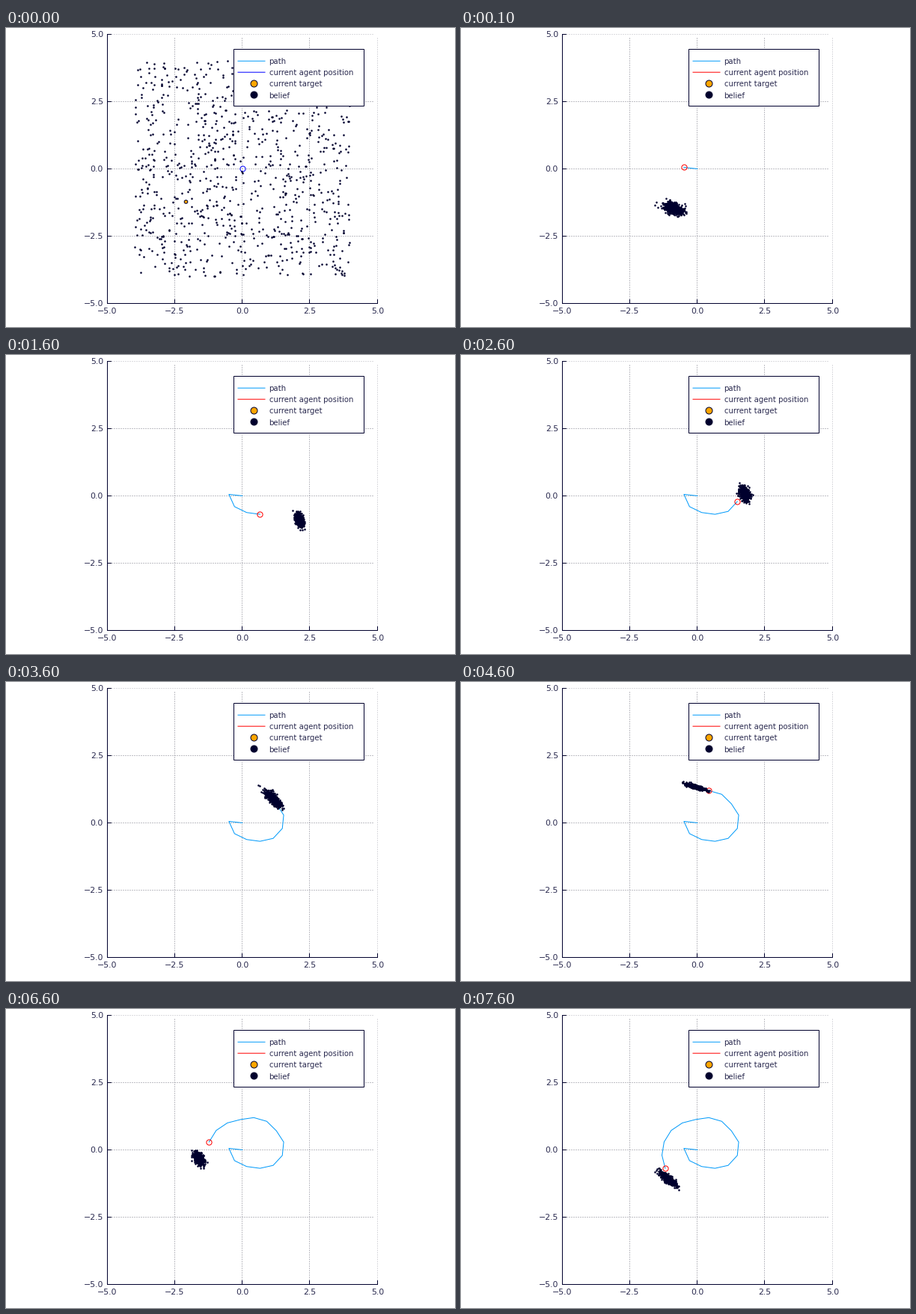
These frames come from a looping animation (600x400 px, 8000 ms). A matplotlib script:

```python
import numpy as np
import matplotlib.pyplot as plt
from matplotlib.animation import FuncAnimation
from matplotlib.patches import Rectangle

DARK, INK, SKY, ORANGE = "#00002d", "#2b2b50", "#009afa", "#ffa500"
RED, BLUE = "#ff0000", "#0000ff"
PX = 0.72  # points per pixel at 100 dpi
SCALE = 36.05  # pixels per data unit
X0, Y0 = 315.8, 188.4  # pixel position of the data origin
STEPS, SPEED = 17, 0.5
BLUE_STEPS = {0, 2, 9}

# step, target x, y, belief half length, half width, tilt in degrees
KEYS = np.array([
    (0, -2.10, -1.22, 0.38, 0.25, -20),
    (2, 0.30, -1.70, 0.48, 0.19, -20),
    (3, 1.62, -1.33, 0.60, 0.25, 30),
    (4, 2.11, -0.88, 0.29, 0.16, 110),
    (7, 1.56, 0.55, 0.32, 0.19, 115),
    (9, 0.72, 1.24, 0.55, 0.13, 150),
    (10, -0.08, 1.34, 0.42, 0.07, 163),
    (12, -2.02, 0.62, 0.22, 0.17, 290),
    (15, -1.41, -0.80, 0.33, 0.18, 310),
    (16, -1.09, -1.08, 0.45, 0.13, 321)])

rng = np.random.default_rng(7)
states = np.column_stack([np.interp(range(STEPS), KEYS[:, 0], col)
                          for col in KEYS[:, 1:].T])


def to_px(points):
    return np.array([X0, Y0]) + SCALE * np.atleast_2d(points) * [1, -1]


def pursue():
    """The agent heads for the target at constant speed after a first guess."""
    path = [np.zeros(2)]
    for k in range(1, STEPS):
        way = states[k, :2] - path[-1] if k > 1 else np.array([-1, 0.11])
        path.append(path[-1] + SPEED * way / np.hypot(*way))
    return to_px(path)


def particles(k):
    if k == 0:
        return to_px(rng.uniform(-4, 4, (920, 2)))
    x, y, length, width, tilt = states[k]
    u, v = rng.normal(0, 1 / 2.3, (2, 600)) * [[length], [width]]
    c, s = np.cos(np.radians(tilt)), np.sin(np.radians(tilt))
    return to_px(np.column_stack([x + u * c - v * s, y + u * s + v * c]))


path = pursue()
targets = to_px(states[:, :2])
clouds = [particles(k) for k in range(STEPS)]

fig = plt.figure(figsize=(6, 4), dpi=100, facecolor="white")
ax = fig.add_axes([0, 0, 1, 1])
ax.set_xlim(0, 600)
ax.set_ylim(400, 0)
ax.axis("off")


def line(xs, ys, color=DARK, z=1, **kw):
    return ax.plot(xs, ys, color=color, lw=PX, zorder=z, **kw)[0]


def dot(x, y, d, face, edge=DARK, z=4):
    return ax.plot([x], [y], "o", ms=d * PX, mfc=face, mec=edge,
                   mew=PX, zorder=z)[0]


def label(x, y, s, size, ha):
    ax.text(x, y, s, fontsize=size * PX, family="DejaVu Sans", color=INK,
            ha=ha, va="center_baseline", zorder=12)


def draw_axes():
    left, right, bottom = 135, 496, 368
    line([left, left], [8, bottom])
    line([left, right], [bottom, bottom])
    for v in np.linspace(-5, 5, 5):
        x, y = to_px((v, v))[0].astype(int)
        dots = dict(ls=(0, (1, 2)), dash_capstyle="butt", z=0,
                    color="#b8b8c0" if v == 5 else "#80808c")
        if v > -5:
            line([x, x], [bottom, 13], **dots)
            line([left, 490], [y, y], **dots)
        line([x, x], [bottom, bottom - 5])
        line([left, left + 5], [y, y])
        text = f"{v:.1f}".replace("-", "\u2212")
        label(x + 0.5, 378, text, 11, "center")
        label(130, y + 0.5, text, 11, "right")


def draw_legend():
    ax.add_patch(Rectangle((304, 28), 174, 76, fc="white", ec=DARK,
                           lw=PX, zorder=10))
    line([310, 346], [44.2, 44.2], SKY, 11, snap=False)
    dot(331, 74, 9, ORANGE, z=11)
    dot(331, 89, 9, DARK, z=11)
    names = ["path", "current agent position", "current target", "belief"]
    for i, name in enumerate(names):
        label(351.5, 44.3 + 15.1 * i, name, 10.15, "left")
    return line([310, 346], [59.2, 59.2], BLUE, 11, snap=False)


draw_axes()
agent_key = draw_legend()
trail = line([], [], SKY, 2)
agent = dot(0, 0, 7.2, "none", BLUE, 3)
target = dot(0, 0, 4.6, ORANGE)
belief = ax.plot([], [], "o", ms=2.6 * PX, mfc=DARK, mew=0, ls="", zorder=5)[0]


def update(i):
    k = (i + 4) // 5  # the first state lasts one tick, the others five
    color = BLUE if k in BLUE_STEPS else RED
    trail.set_data(*path[:k + 1].T)
    agent.set_data(*path[k:k + 1].T)
    agent.set_markeredgecolor(color)
    agent_key.set_color(color)
    target.set_data(*targets[k:k + 1].T)
    belief.set_data(*clouds[k].T)
    return trail, agent, agent_key, target, belief


anim = FuncAnimation(fig, update, frames=80, interval=100, repeat=True,
                     repeat_delay=0, blit=False)
plt.show()
```
